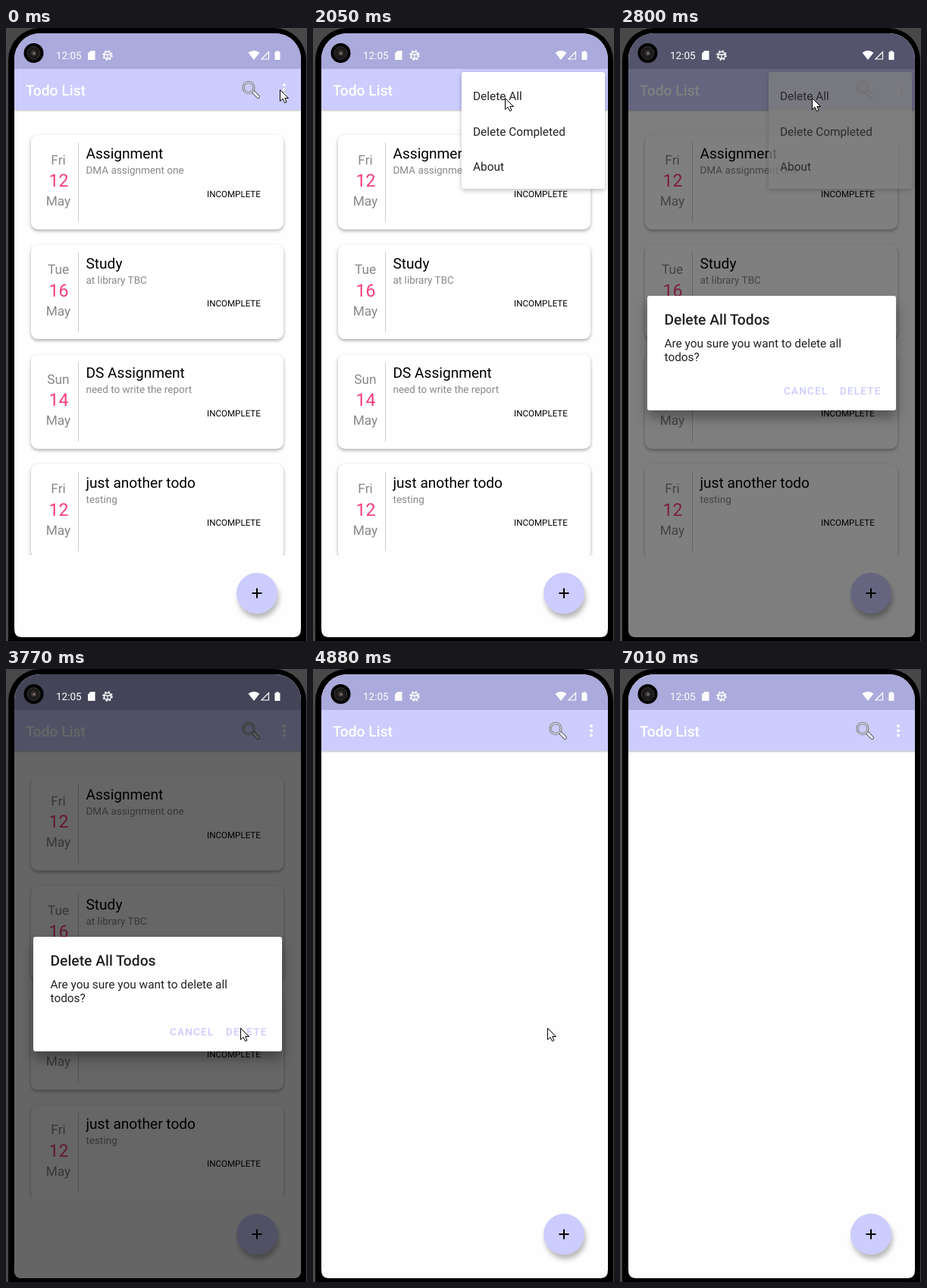
Write an HTML page that moves like this. It is 397 px wide and 808 px high and loops after 7.72 s.

```html
<!DOCTYPE html>
<html lang="en">
<head>
<meta charset="utf-8">
<title>Todo List</title>
<style>
  html, body { margin: 0; width: 100%; height: 100%; overflow: hidden; background: #000; }
  svg { display: block; }
  text { font: 13.5px Roboto, sans-serif; text-rendering: geometricPrecision; white-space: pre; }
  .heading { font-size: 19.25px; font-weight: 500; }
  .title { font-size: 19.1px; }
  .date { font-size: 17.3px; text-anchor: middle; fill: #888; }
  .day { font-size: 23.1px; text-anchor: middle; fill: #f73a7c; }
  .note { fill: #888; }
  .status { font-size: 11.6px; }
  .item { font-size: 15.4px; fill: #222; }
  .button { font-weight: 500; letter-spacing: 1.2px; fill: #cccaff; }
  .card { filter: drop-shadow(0 2px 2px #0005); }
  .bar { filter: drop-shadow(0 1px 1px #0004); }
  .fab { filter: drop-shadow(2px 6px 3px #0004); }
  .popup { filter: drop-shadow(0 2px 3px #0004); }
  .modal { filter: drop-shadow(0 10px 8px #0005); }
</style>
</head>
<body>
<svg width="397" height="808" viewBox="0 0 397 808">
  <defs>
    <clipPath id="screen"><path d="M11 41A34 34 0 0 1 45 7H355A34 34 0 0 1 389 41V792Q389 803 380 803H20Q11 803 11 792Z"/></clipPath>
    <clipPath id="viewport"><rect x="11" y="120" width="378" height="575"/></clipPath>
  </defs>

  <rect width="397" height="808" fill="#484848"/>
  <rect x="3" y="0" width="393" height="860" rx="42"/>

  <g clip-path="url(#screen)">
    <rect width="397" height="808" fill="#fefefe"/>
    <g id="list" clip-path="url(#viewport)"></g>
    <g class="fab"><circle cx="331" cy="745" r="27" fill="#ccccff"/></g>
    <path d="M324.5 745h13M331 738.5v13" stroke="#000" stroke-width="2"/>

    <rect class="bar" x="11" y="54" width="378" height="54" fill="#ccccff"/>
    <rect x="11" y="7" width="378" height="47" fill="#aaaadc"/>
    <text class="heading" x="26" y="89" fill="#fff">Todo List</text>
    <g fill="none" stroke-linecap="round">
      <path d="M326 84l6.5 6.5" stroke="#666" stroke-width="5"/>
      <path d="M326.5 84.500l6 6" stroke="#e8e8f4" stroke-width="3"/>
      <circle cx="320" cy="78.500" r="7" stroke="#666" stroke-width="3"/>
      <circle cx="320" cy="78.500" r="7" stroke="#e0e0ec" stroke-width="1.300"/>
    </g>
    <g fill="#fff"><circle cx="367" cy="75" r="2"/><circle cx="367" cy="81.300" r="2"/><circle cx="367" cy="87.600" r="2"/></g>

    <g id="menu">
      <rect class="popup" x="196" y="58" width="189" height="154" rx="3" fill="#fff"/>
      <text class="item" x="211" y="95">Delete All</text>
      <text class="item" x="211" y="141.500">Delete Completed</text>
      <text class="item" x="211" y="188">About</text>
    </g>

    <rect id="dim" width="397" height="808"/>

    <g fill="#fff">
      <text x="66" y="41" fill="#fff">12:05</text>
      <path d="M111.500 30h6v12h-9.500v-8.500z"/>
      <path d="M319.500 32.500q7.500-5.500 15 0l-7.500 9.500z"/>
      <path d="M337 41h9.500V31.500z" fill="none" stroke="#fff" stroke-width="1.200"/>
      <path d="M354.500 31.500h2v-1.500h3v1.500h2v10.500h-7z"/>
    </g>
    <g fill="none" stroke="#fff">
      <circle cx="134" cy="36" r="4.600" stroke-width="1.500"/>
      <circle cx="134" cy="36" r="6" stroke-width="1.600" stroke-dasharray="2.350"/>
      <path d="M129.500 35h9M134 36v4.500" stroke-width="1.300"/>
    </g>

    <g id="dialog">
      <rect class="modal" x="36" y="353" width="328" height="151" rx="3" fill="#fff"/>
      <rect id="ripple" x="284" y="460" width="59" height="34" rx="8" fill="#ccccff" opacity=".35"/>
      <text class="heading" x="58.500" y="391" fill="#222">Delete All Todos</text>
      <text class="item" x="58.500" y="420.500">Are you sure you want to delete all</text>
      <text class="item" x="58.500" y="438.500">todos?</text>
      <text class="button" x="216" y="482.500">CANCEL</text>
      <text class="button" x="290" y="482.500">DELETE</text>
    </g>
  </g>

  <circle cx="36.500" cy="33" r="13"/>
  <circle cx="36.500" cy="33" r="8.500" fill="#1c1b1b" stroke="#383635"/>
  <circle cx="36.500" cy="33" r="3.500" fill="#3d3835"/>
  <circle cx="37" cy="33.500" r="1.200" fill="#9a8c84"/>

  <path id="cursor" d="M.5 .5V15.500L4 12.300 6.500 17.500 9 16.500 6.800 11.500H11.500Z" fill="#fff" stroke="#000"/>
</svg>
<script>
const LOOP = 7720;
const $ = id => document.getElementById(id);

const todos = [
  ['Fri', 12, 'Assignment', 'DMA assignment one'],
  ['Tue', 16, 'Study', 'at library TBC'],
  ['Sun', 14, 'DS Assignment', 'need to write the report'],
  ['Fri', 12, 'just another todo', 'testing'],
];
$('list').innerHTML = todos.map(([weekday, day, title, note], i) => `
  <g transform="translate(33 ${141 + i * 144.6})">
    <rect class="card" width="333" height="124.500" rx="9" fill="#fff"/>
    <path d="M62.500 10V115" stroke="#ccc"/>
    <text class="date" x="36" y="38.500">${weekday}</text>
    <text class="day" x="36.500" y="68">${day}</text>
    <text class="date" x="36" y="93">May</text>
    <text class="title" x="72.500" y="31">${title}</text>
    <text class="note" x="72.500" y="51">${note}</text>
    <text class="status" x="232" y="81.500">INCOMPLETE</text>
  </g>`).join('');

// Held states: each row is [start time, ...values].
const cursorSteps = [
  [0, 361, 81], [1750, 341, 85], [1900, 271, 92], [2050, 253, 92],
  [3380, 271, 347], [3520, 295, 430], [3650, 305, 464], [3770, 309, 473],
  [6290, 309, 493], [6430, 322, 627], [6560, 346, 746],
  [6710, 349, 785], [6860, 351, 801], [7010, 400, 820],
];
const menuSteps = [[0, 0, 1], [920, .6, .92], [1070, 1, 1], [2800, .75, 1], [2950, 0, 1]]; // opacity, scale
const dimSteps = [[0, 0], [2650, .2], [2800, .5], [2950, .6], [4760, .27], [4880, 0]];
const dialogSteps = [[0, 0, 0, 1], [2650, .5, 0, .96], [2800, 1, 0, 1], [4760, .55, -4, 1], [4880, 0, 0, 1]]; // opacity, dy, scale

const at = (steps, t) => steps.findLast(step => step[0] <= t).slice(1);
const place = (id, x, y, scale = 1, cx = 0, cy = 0) => $(id).setAttribute('transform',
  `translate(${x + cx} ${y + cy}) scale(${scale}) translate(${-cx} ${-cy})`);
const show = (id, visible) => $(id).style.display = visible ? '' : 'none';

function draw(now) {
  const t = now % LOOP;
  place('cursor', ...at(cursorSteps, t));

  const [menuOpacity, menuScale] = at(menuSteps, t);
  $('menu').style.opacity = menuOpacity;
  place('menu', 0, 0, menuScale, 385, 58);

  $('dim').style.opacity = at(dimSteps, t)[0];

  const [dialogOpacity, dy, dialogScale] = at(dialogSteps, t);
  $('dialog').style.opacity = dialogOpacity;
  place('dialog', 0, dy, dialogScale, 200, 428);

  show('list', t < 4760);
  show('ripple', t >= 4760);
  requestAnimationFrame(draw);
}
requestAnimationFrame(draw);
</script>
</body>
</html>
```
